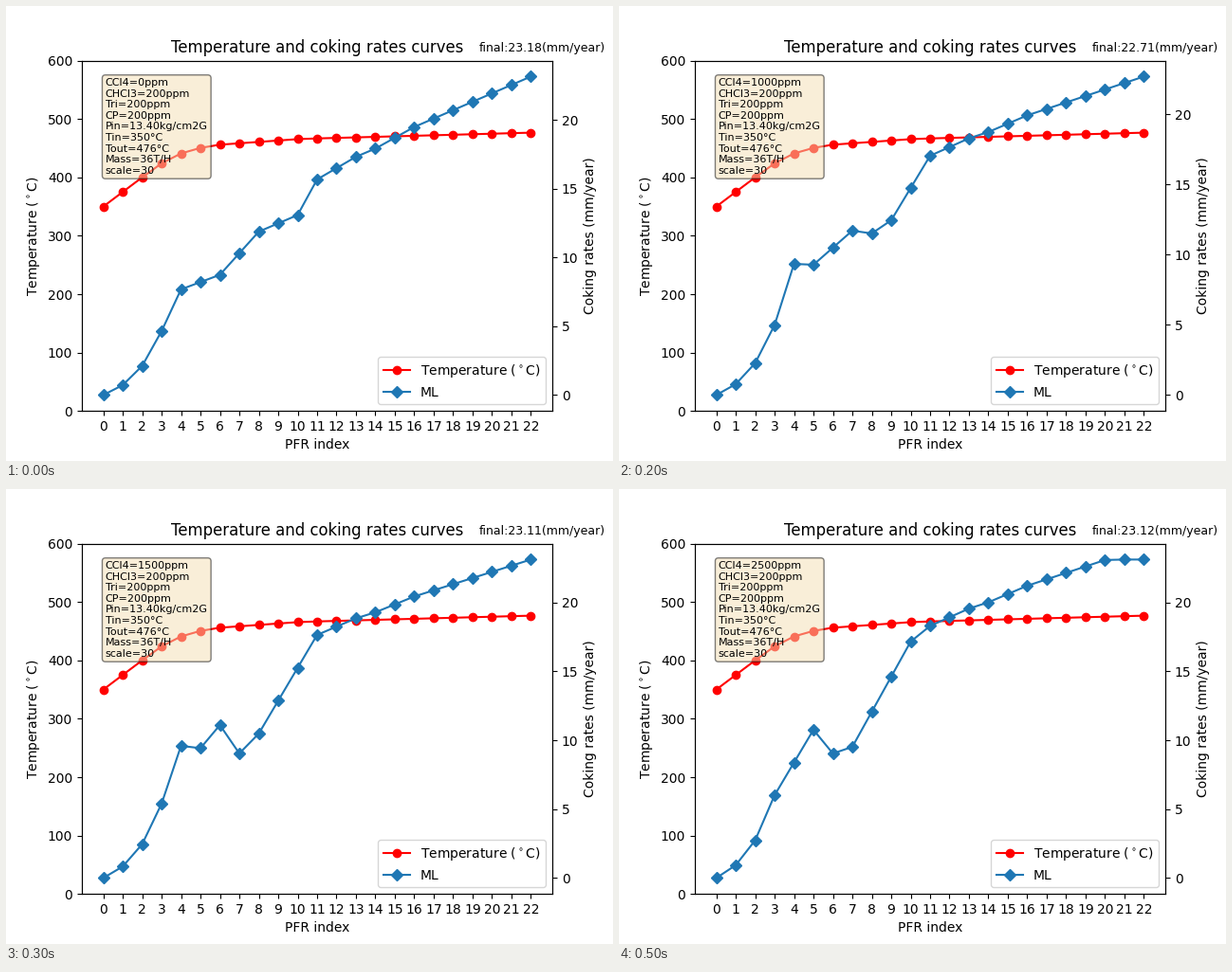
A matplotlib script that plays this animation: 640 by 480 pixels, repeating every 600 ms.

```python
import numpy as np
import matplotlib.pyplot as plt
from matplotlib.animation import FuncAnimation

plt.rcParams["font.family"] = "DejaVu Sans"

CCL4_STEP = 500  # ppm added per frame
index = np.arange(23)

# Outlet temperatures: steep rise, then a nearly linear plateau.
temperature = np.interp(index, [0, 2, 3, 4, 5, 6, 10, 11, 22],
                        [350, 400, 424, 441, 450.5, 456, 465.5, 466.7, 476.6])

# Turning points of each coking curve, as {reactor: rate}.
turning_points = [
    {3: 4.65, 4: 7.69, 6: 8.75, 8: 11.89, 10: 13.1, 11: 15.69, 22: 23.18},
    {3: 4.56, 4: 8.84, 5: 9.69, 6: 9.72, 9: 14.06, 11: 16.3, 22: 22.09},
    {3: 4.99, 4: 9.35, 5: 9.29, 7: 11.72, 8: 11.52, 9: 12.46, 11: 17.06, 22: 22.71},
    {3: 5.39, 4: 9.59, 5: 9.42, 6: 11.1, 7: 9.04, 8: 10.48, 11: 17.64, 22: 23.11},
    {3: 5.74, 4: 9.86, 5: 10.1, 6: 11.51, 7: 8.69, 10: 15.98, 11: 17.98, 22: 23.11},
    {3: 6.01, 5: 10.76, 6: 9.04, 7: 9.52, 10: 17.16, 11: 18.3, 22: 23.12},
]
ONSET = {0: 0, 1: 0.155, 2: 0.455}        # share of the rate at reactor 3
TAIL = {13: 0.22, 14: 0.30, 16: 0.51}     # share of the climb from 11 to 22


def coking_rates(level):
    """Rates at every reactor; high levels reach their final rate early."""
    points = turning_points[level]
    start, final = points[11], points[22]
    goal = final + 0.45 * max(0, level - 3)
    knots = {n: share * points[3] for n, share in ONSET.items()}
    knots |= points
    knots |= {n: start + share * (goal - start) for n, share in TAIL.items()}
    knots[22] = goal
    reactors = sorted(knots)
    rates = np.interp(index, reactors, [knots[n] for n in reactors])
    return np.minimum(rates, final)


fig, ax = plt.subplots(figsize=(6.4, 4.8), dpi=100)
rate_ax = ax.twinx()

temp_line, = ax.plot(index, temperature, "o-", color="red",
                     label=r"Temperature ($^\circ$C)")
rate_line, = rate_ax.plot(index, np.zeros(23), "D-", color="C0", label="ML")

ax.set_title("Temperature and coking rates curves", fontsize=11.9)
ax.set_xlabel("PFR index")
ax.set_ylabel(r"Temperature ($^\circ$C)")
ax.set_xticks(index)
ax.set_ylim(0, 600)
rate_ax.set_ylabel("Coking rates (mm/year)")
rate_ax.set_yticks(range(0, 21, 5))
rate_ax.legend(handles=[temp_line, rate_line], loc="lower right")

conditions = ax.text(0.05, 0.95, "", transform=ax.transAxes, fontsize=8, va="top",
                     bbox=dict(boxstyle="round", facecolor="wheat", alpha=0.5))
final_label = ax.text(0.845, 1.025, "", transform=ax.transAxes, fontsize=9)


def update(frame):
    rates = coking_rates(frame)
    final = rates[-1]
    rate_line.set_ydata(rates)
    rate_ax.set_ylim(-0.05 * final, 1.05 * final)
    final_label.set_text(f"final:{final:.2f}(mm/year)")
    conditions.set_text("\n".join([
        f"CCl4={CCL4_STEP * frame}ppm", "CHCl3=200ppm", "Tri=200ppm", "CP=200ppm",
        "Pin=13.40kg/cm2G", "Tin=350°C", "Tout=476°C", "Mass=36T/H", "scale=30",
    ]))
    return rate_line, final_label, conditions


anim = FuncAnimation(fig, update, frames=len(turning_points), interval=100, repeat=True)
plt.show()
```
